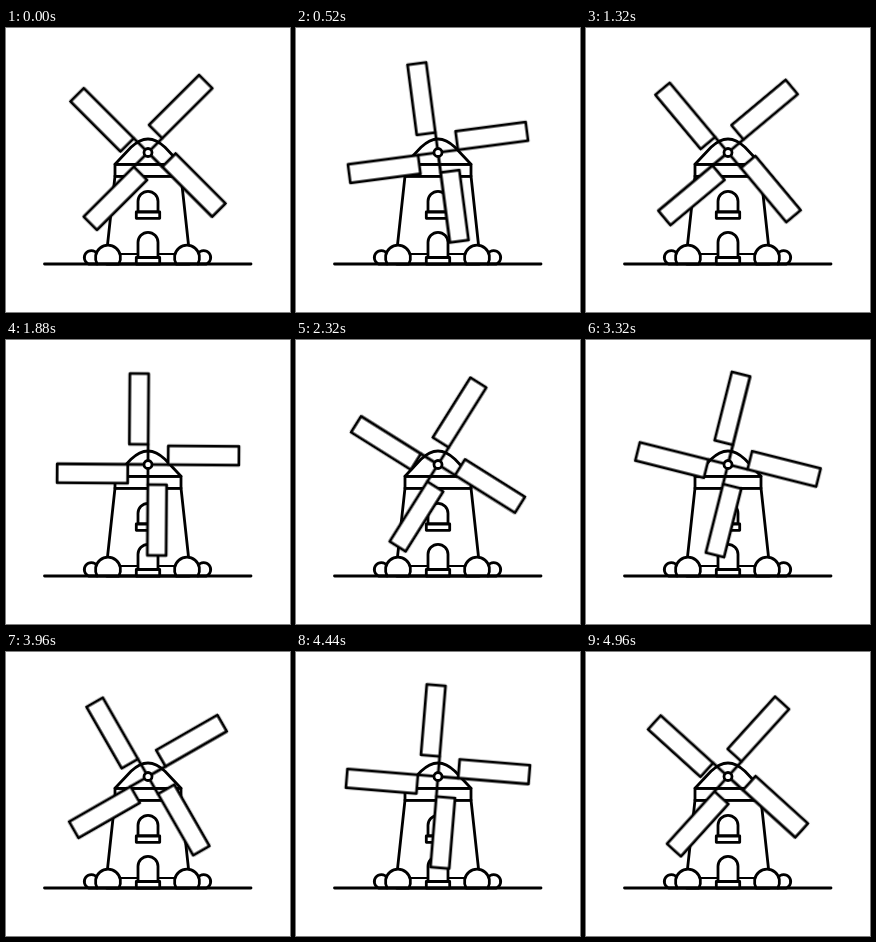
Recreate the animation shown at these times as an HTML page. Size 284x284 px, loop 5 s.

```html
<!DOCTYPE html>
<html lang="en">
<head>
<meta charset="utf-8">
<title>Windmill</title>
<style>
  html, body { margin: 0; width: 100%; height: 100%; overflow: hidden; background: #fff; }
  svg { display: block; width: 100vw; height: 100vh; }
  .ink { fill: #fff; stroke: #000; stroke-width: 2.8; stroke-linejoin: round; stroke-linecap: round; }
  #sails { transform-origin: 142px 124.5px; }
</style>
</head>
<body>
<svg viewBox="0 0 284 284">
  <defs>
    <g id="sail">
      <path d="M0 0V-20"/>
      <rect x="-18.8" y="-90.8" width="18.8" height="70.6"/>
    </g>
    <g id="bushes">
      <path d="M82.5 236A7 7 0 1 1 91 225.5V236Z"/>
      <path d="M91.2 236A12.5 12.5 0 1 1 112.8 236Z"/>
    </g>
  </defs>
  <g class="ink">
    <path d="M109 148L100.5 226V236H183.5V226L175 148Z"/>
    <path d="M114 226H170" stroke-width="1.8"/>
    <rect x="109" y="136.3" width="66" height="12"/>
    <path d="M109 136.3L125 119.3Q142 102.5 159 119.3L175 136.3Z"/>
    <path d="M132 184V173.3a10 10 0 0 1 20 0V184Z"/>
    <rect x="130.3" y="184" width="23.4" height="6.3"/>
    <path d="M132 229.5V214.3a10 10 0 0 1 20 0V229.5Z"/>
    <rect x="130.3" y="229.5" width="23.4" height="6.5"/>
    <use href="#bushes"/>
    <use href="#bushes" transform="matrix(-1 0 0 1 283 0)"/>
    <path d="M38.5 236H245"/>
    <g id="sails">
      <g transform="translate(142 124.5)">
        <use href="#sail"/>
        <use href="#sail" transform="rotate(90)"/>
        <use href="#sail" transform="rotate(180)"/>
        <use href="#sail" transform="rotate(270)"/>
      </g>
    </g>
    <circle cx="142" cy="124.5" r="4"/>
  </g>
</svg>
<script>
  // One full clockwise turn per loop, starting on the diagonal.
  document.getElementById('sails').animate(
    [{ transform: 'rotate(45deg)' }, { transform: 'rotate(405deg)' }],
    { duration: 5000, iterations: Infinity, easing: 'linear' }
  );
</script>
</body>
</html>
```
